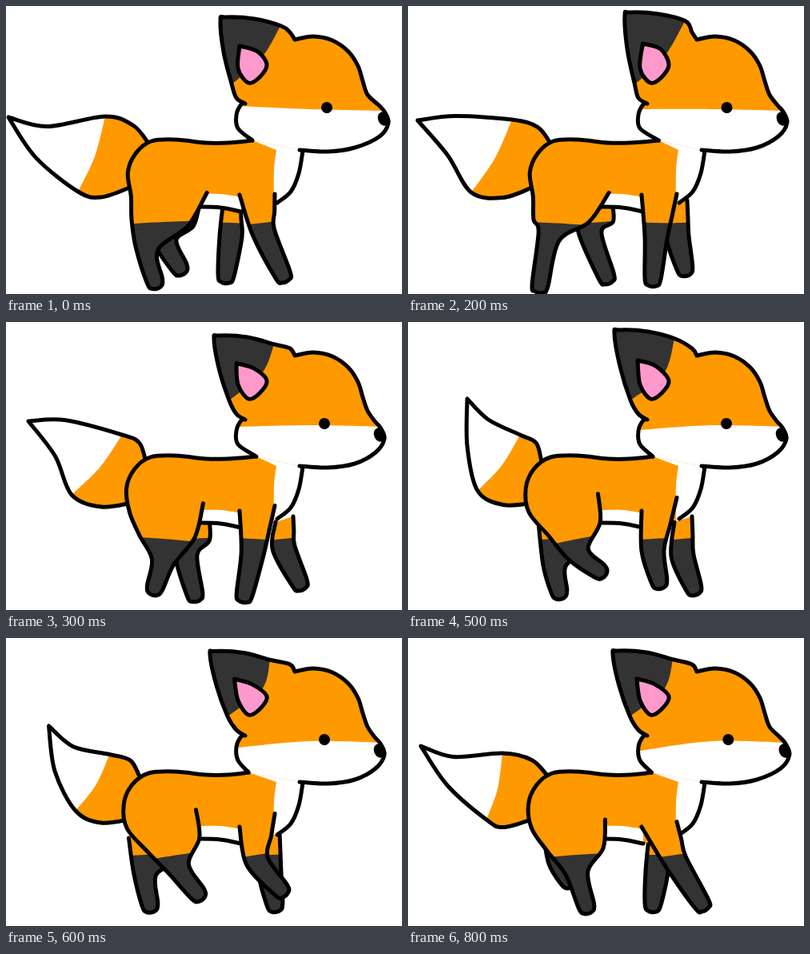
Write an HTML page with a canvas that moves like this. It is 495x360 px and loops after 0.9 s.

```html
<!DOCTYPE html>
<html lang="en">
<head>
<meta charset="utf-8">
<title>Walking fox</title>
<style>
html, body { margin: 0; width: 100%; height: 100%; overflow: hidden; background: #fff; }
canvas { display: block; }
</style>
</head>
<body>
<canvas id="stage" width="495" height="360"></canvas>
<script>
const ORANGE = '#ff9900', DARK = '#333333', PINK = '#ff99cc', WHITE = '#fff', BLACK = '#000';
const STEP = 100, STEPS = 9, SOCK_Y = 272;

// Key poses: the step each belongs to, then one row per pose.
const KEY_STEPS = [0, 2, 3, 5, 7, 8, STEPS];
// Knee x, y and foot x, y.
const HIND = [[176, 303, 186, 344], [176, 288, 165, 349], [196, 300, 186, 332],
  [213, 290, 239, 311], [218, 286, 240, 328], [211, 294, 223, 335]];
const FAR_HIND = [[199, 294, 217, 327], [228, 285, 248, 338], [225, 292, 236, 340],
  [183, 305, 189, 337], [164, 285, 171, 330], [190, 282, 200, 303]];
const FORE = [[322, 283, 346, 336], [310, 290, 306, 341], [308, 290, 298, 341],
  [306, 286, 314, 324], [322, 272, 373, 305], [335, 280, 367, 332]];
const FAR_FORE = [[281, 288, 275, 337], [337, 288, 346, 328], [347, 282, 367, 326],
  [343, 292, 357, 332], [317, 295, 315, 334], [311, 292, 306, 333]];
// Crest x, y, tip x, y, lower end of the white x, y, sag.
const TAIL = [[124, 138, 3, 139, 90, 232, 12], [130, 142, 12, 143, 79, 233, -5],
  [145, 141, 28, 124, 82, 216, -8], [140, 141, 74, 96, 87, 211, 8],
  [119, 150, 33, 124, 87, 221, 15], [118, 144, 16, 135, 98, 227, 10]];
const EAR_TIP = [[268, 18], [271, 12], [260, 21], [258, 14], [252, 27], [256, 20]];

const pts = text => text.split(' ').map(p => p.split(',').map(Number));
const BELLY = pts('240,251 268,252 294,257');
const BELLY_TOP = pts('294,239 268,235 240,235');
const CHEST = pts('339,246 356,232 366,209 371,181');
const BIB = pts('338,180 335,205 335,246');
const SKULL = pts('361,42 384,38 408,43 428,57 440,75 446,94 452,111 461,124 468,132 473,146 462,163 436,177 402,182 367,180');

const ctx = document.getElementById('stage').getContext('2d');
ctx.lineCap = ctx.lineJoin = 'round';

const mix = (a, b, k) => a.map((v, i) => v + (b[i] - v) * k);
const along = (p, d, r) => [p[0] + d[0] * r, p[1] + d[1] * r];
const turn = ([x, y]) => [-y, x];
const unit = ([x, y]) => [x / Math.hypot(x, y), y / Math.hypot(x, y)];
const toward = (a, b) => unit([b[0] - a[0], b[1] - a[1]]);

function poseOf(rows, step) {
  const i = KEY_STEPS.findLastIndex(key => key <= step);
  const k = (step - KEY_STEPS[i]) / (KEY_STEPS[i + 1] - KEY_STEPS[i]);
  return mix(rows[i], rows[(i + 1) % rows.length], k);
}

// Smooth curve through every run of points, with a corner between runs.
function shape(...runs) {
  const path = new Path2D();
  runs.forEach((run, r) => {
    path[r ? 'lineTo' : 'moveTo'](...run[0]);
    for (let i = 1; i < run.length; i++) {
      const a = run[i - 1], b = run[i], before = run[i - 2] || a, after = run[i + 1] || b;
      path.bezierCurveTo(
        a[0] + (b[0] - before[0]) / 6, a[1] + (b[1] - before[1]) / 6,
        b[0] - (after[0] - a[0]) / 6, b[1] - (after[1] - a[1]) / 6, ...b);
    }
  });
  return path;
}

function fill(path, color) {
  ctx.fillStyle = color;
  ctx.fill(path);
}

function line(path) {
  ctx.lineWidth = 5;
  ctx.stroke(path);
}

// Colours the part of a shape on the right-hand side of a cut curve.
function fillBeyond(path, cut, color) {
  const a = cut[0], b = cut[cut.length - 1], d = toward(a, b), side = turn(d);
  const end = along(b, d, 300), begin = along(a, d, -300);
  ctx.save();
  ctx.clip(path);
  fill(shape(cut, [end], [along(end, side, 300)], [along(begin, side, 300)], [begin]), color);
  ctx.restore();
}

// Outline down the left of a leg, round the paw and up the right.
function limb(left, right, [kneeX, kneeY, footX, footY], bulge = 0) {
  const knee = [kneeX, kneeY], foot = [footX, footY];
  const shin = toward(knee, foot), thigh = toward(mix(left, right, 0.5), knee);
  const across = turn(unit([shin[0] + thigh[0], shin[1] + thigh[1]]));
  const paw = [0, 1, 2, 3].map(i => {
    const angle = i * Math.PI / 3;
    return along(along(foot, turn(shin), 10 * Math.cos(angle)), shin, 10 * Math.sin(angle));
  });
  const back = along(knee, across, -14);
  const calf = along(mix(back, right, 0.5), turn(toward(back, right)), bulge);
  return [left, along(knee, across, 14), ...paw, back, calf, right];
}

function drawLeg(path, [kneeX, kneeY, footX, footY]) {
  const tilt = 15 * toward([kneeX, kneeY], [footX, footY])[0];
  fill(path, ORANGE);
  fillBeyond(path, [[kneeX - 60, SOCK_Y + tilt], [kneeX, SOCK_Y - 1], [kneeX + 60, SOCK_Y - tilt]], DARK);
  line(path);
}

function drawTail(step, sway) {
  const [cx, cy, tx, ty, sx, sy, sag] = poseOf(TAIL, step);
  const crest = [cx, cy], tip = [tx, ty], split = [sx, sy], base = [173 + 7 * sway, 172];
  const dip = along(mix(crest, tip, 0.6), [0, 1], sag);
  const under = along(mix(tip, split, 0.5), [-0.8, 0.3], sag);
  const path = shape(
    [base, along(mix(base, crest, 0.45), [0.6, -0.8], 9), crest, dip, tip],
    [tip, under, split, [119, sy / 2 + 123], [157, 226]]);
  fill(path, WHITE);
  fillBeyond(path, [split, along(mix(split, crest, 0.5), [0.8, 0.6], 5), crest], ORANGE);
  line(path);
}

function dot(x, y, rx, ry) {
  const path = new Path2D();
  path.ellipse(x, y, rx, ry, -0.4, 0, Math.PI * 2);
  fill(path, BLACK);
}

function drawHead(step, neck, lean) {
  const tip = poseOf(EAR_TIP, step), fromTip = (x, y) => [tip[0] + x, tip[1] + y];
  const low = [175 + tip[0] * 0.4, 98];
  const skull = SKULL.map(([x, y]) => [x > 455 ? x + 5 * lean : x, y]);
  const path = shape(
    [neck, [290, 153], [288, 136], [294, 123], [299, 122]],
    [[299, 122], [288, 115], low, along(mix(low, tip, 0.5), [-1, 0], 3), tip,
      fromTip(6, -4), fromTip(42, -2), fromTip(76, 7), [355, 33], skull[0]],
    skull);
  fill(path, ORANGE);
  fillBeyond(path, [[290, 125 + 2 * step], [380, 129], [475, 131]], WHITE);
  fillBeyond(path, [fromTip(75, 7), [320, 64], low], DARK);
  line(path);

  const corner = mix([284, 50], fromTip(32, 32), 0.5);
  const inner = shape([corner, along(corner, [1, 0.3], 22), [326, 73], [317, 89], [303, 96], [290, 78], corner]);
  fill(inner, PINK);
  line(inner);
  dot(398 + 3 * lean, 127, 7, 7);
  dot(467 + 5 * lean, 141, 7, 9);
}

function draw(step) {
  const phase = 2 * Math.PI / STEPS;
  const sway = Math.cos(phase * (step - 1)), lean = Math.max(0, Math.cos(phase * step));
  const neck = [308 + 5.5 * Math.sin(phase * step), 168];
  const hind = poseOf(HIND, step), farHind = poseOf(FAR_HIND, step);
  const fore = poseOf(FORE, step), farFore = poseOf(FAR_FORE, step);

  ctx.clearRect(0, 0, 495, 360);
  drawTail(step, sway);
  drawLeg(shape(limb([farHind[0] - 20, 250], [farHind[0] / 2 + 142, 250], farHind, 8)), farHind);
  drawLeg(shape(limb([farFore[0] - 10, 250], [farFore[0] + 12, 243], farFore)), farFore);

  const spine = [neck, [277, 171], [250, 171], [212, 167], [180 + 2 * sway, 169],
    [160 + 3 * sway, 184], [150 + 3 * sway, 208], [154 + 3 * sway, 238]];
  const hip = [245 + 8 * sway, 225 + 11 * sway];
  fill(shape(spine, [hip], BELLY, CHEST), ORANGE);
  fill(shape(BELLY, BELLY_TOP), WHITE);
  fill(shape([neck], BIB, CHEST, [[350, 170]]), WHITE);
  line(shape(BELLY));
  line(shape(CHEST));

  drawLeg(shape([...spine, ...limb([hind[0] / 2 + 69, 267], hip, hind, 9)]), hind);
  drawLeg(shape(limb([292, 236], [336, 228 + 9 * sway], fore)), fore);
  drawHead(step, neck, lean);
}

const start = performance.now();
let shown = -1;

function tick() {
  const step = Math.floor((performance.now() - start) / STEP) % STEPS;
  if (step !== shown) draw(shown = step);
  requestAnimationFrame(tick);
}
tick();
</script>
</body>
</html>
```
